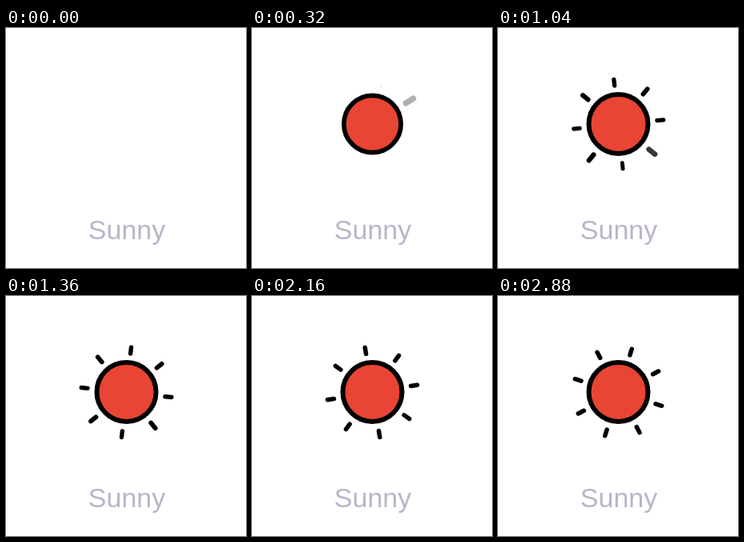
Recreate the animation shown at these times as an HTML page. Size 300 by 300 pixels, loop 2920 ms.

```html
<!DOCTYPE html>
<html lang="en">
<head>
<meta charset="utf-8">
<title>Sunny</title>
<style>
  html, body { margin: 0; width: 100%; height: 100%; overflow: hidden; background: #fff; }
  svg { display: block; width: 100%; height: 100%; }
  text { font: 34px "Liberation Sans", Arial, sans-serif; fill: #b9b5cb; text-anchor: middle; }
</style>
</head>
<body>
<svg viewBox="0 0 300 300">
  <g id="rays" stroke="#000" stroke-width="5.5" stroke-linecap="round"></g>
  <circle id="sun" r="37" fill="#e84535" stroke="#000" stroke-width="6"/>
  <text x="151" y="264">Sunny</text>
</svg>
<script>
const LOOP = 2920, STEP = 40;
const RAY_COUNT = 8, FIRST_RAY = 216, STAGGER = 80;
const RAY_BASE = 46;

const sun = document.getElementById('sun');
const rayGroup = document.getElementById('rays');
const rays = Array.from({ length: RAY_COUNT }, () => {
  const line = document.createElementNS('http://www.w3.org/2000/svg', 'line');
  line.setAttribute('y1', -2.75);
  line.setAttribute('y2', -10.75);
  return rayGroup.appendChild(line);
});

const clamp = v => Math.max(0, Math.min(1, v));

// Underdamped spring: peaks at 1.2 after 150 ms, then settles at 1.
function sunScale(t) {
  const w = Math.PI / 150, decay = 0.0107;
  return 1 - Math.exp(-decay * t) * (Math.cos(w * t) + decay / w * Math.sin(w * t));
}

// Quick growth followed by a long wobble.
function rayScale(age) {
  const wobble = 0.08 - 0.4 * Math.cos(2 * Math.PI * (age - 24) / 160);
  return clamp(age / 48) * (1 + Math.exp(-age / 300) * wobble);
}

function place(el, transform, opacity) {
  el.setAttribute('transform', transform);
  el.setAttribute('opacity', opacity);
}

function render(t) {
  place(sun, `translate(150.5 120) scale(${sunScale(t)})`, clamp(t / 240));
  const spin = 0.9 + 0.0369 * t;
  rays.forEach((ray, i) => {
    const age = Math.max(0, t - FIRST_RAY - i * STAGGER);
    const angle = spin + 45 * (1 - i);
    place(ray,
      `translate(150.5 120.5) rotate(${angle}) translate(0 ${-RAY_BASE}) scale(${rayScale(age)})`,
      clamp(age / 340));
  });
}

const start = performance.now();
function tick() {
  const t = (performance.now() - start) % LOOP;
  render(Math.floor(t / STEP) * STEP);
  requestAnimationFrame(tick);
}
tick();
</script>
</body>
</html>
```
